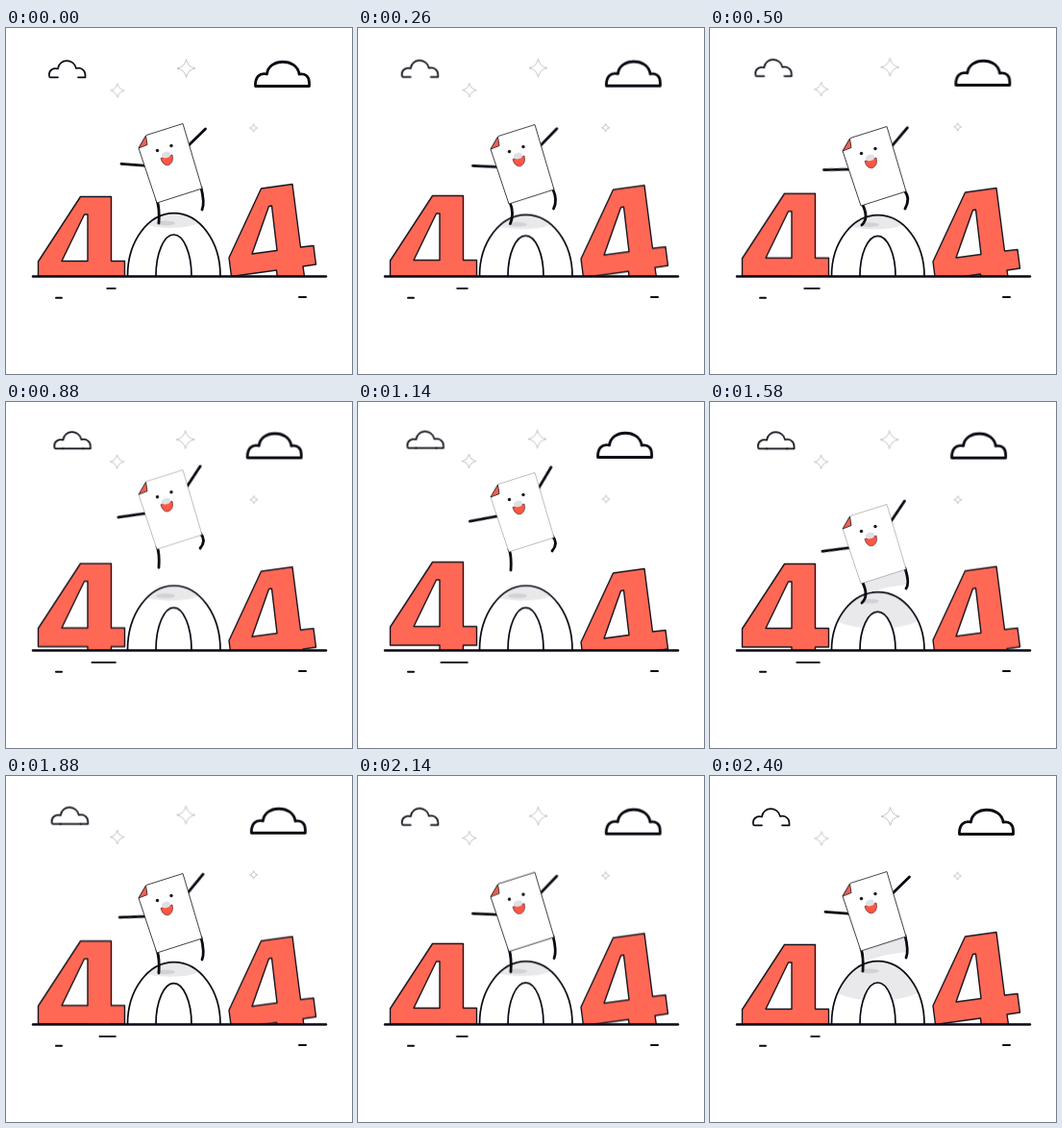
Write an HTML page without scripts that moves like this. It is 360 by 360 pixels and loops after 2420 ms.

```html
<!DOCTYPE html>
<html lang="en">
<head>
<meta charset="utf-8">
<title>404</title>
<style>
  html, body { margin: 0; width: 100%; height: 100%; overflow: hidden; background: #fff; }
  svg { display: block; width: 100%; height: 100%; }

  .ink { fill: none; stroke: #080912; stroke-linecap: round; stroke-linejoin: round; }
  .digit { fill: #ff6854; stroke: #17141f; stroke-width: 1.4; stroke-linejoin: round; }
  .star { fill: #fff; stroke: #c4c4c4; stroke-width: 1; stroke-linejoin: round; }
  .thin { stroke: #2b2b33; stroke-width: .9; stroke-linejoin: round; }
  .shade { fill: #e9e9ec; }

  /* Slow back-and-forth shared by clouds, stars, digits and arms */
  .drift { animation: drift 1210ms cubic-bezier(.37, 0, .63, 1) infinite alternate; }
  @keyframes drift {
    from { transform: translate(0, 0) rotate(0deg); }
    to { transform: translate(var(--x, 0px), var(--y, 0px)) rotate(var(--r, 0deg)); }
  }

  .dash { transform-origin: 114.5px 271px; animation: stretch 1210ms cubic-bezier(.37, 0, .63, 1) infinite alternate; }
  @keyframes stretch { to { transform: scaleX(2.9); } }

  .base { animation: close 2420ms step-end infinite; }
  @keyframes close { 0%, 88% { opacity: 0; } 29% { opacity: 1; } }

  .hop { animation: hop 2420ms infinite; }
  @keyframes hop {
    0% { transform: translateY(0); animation-timing-function: ease-in; }
    20.7% { transform: translateY(3px); animation-timing-function: ease-out; }
    26.4% { transform: translateY(6px); animation-timing-function: cubic-bezier(.33, .67, .67, 1); }
    40.5% { transform: translateY(-32px); animation-timing-function: cubic-bezier(.33, 0, .67, .33); }
    57.9% { transform: translateY(9px); animation-timing-function: ease-in-out; }
    65.3% { transform: translateY(7px); animation-timing-function: linear; }
    77.7% { transform: translateY(2px); animation-timing-function: ease-out; }
    100% { transform: translateY(0); }
  }

  /* The outline pales in the air, the shadow spreads on landing */
  .sheet { animation: pale 2420ms linear infinite; }
  @keyframes pale { 0%, 26%, 74%, 100% { stroke-opacity: 1; } 32%, 66% { stroke-opacity: .35; } }
  .landing { animation: landing 2420ms step-end infinite; }
  @keyframes landing { 0%, 70% { opacity: 0; } 57.9%, 94% { opacity: 1; } }

  .arch { transform-origin: 174.5px 258px; animation: squash 2420ms infinite; }
  .arch path { vector-effect: non-scaling-stroke; }
  @keyframes squash {
    0%, 100% { transform: scaleY(1); }
    20.7% { transform: scaleY(.97); }
    26.4% { transform: scaleY(.93); }
    32%, 55.4% { transform: scaleY(1.025); }
    58.5% { transform: scaleY(.91); }
    65.3% { transform: scaleY(.923); }
    77.7% { transform: scaleY(.985); }
  }

  .left-leg { animation: left-leg 2420ms linear infinite; }
  @keyframes left-leg {
    0%, 77.7%, 100% { d: path("M157 179Q160 188 159 203"); }
    20.7%, 26.4%, 58%, 65.3% { d: path("M158 179Q166 195 158 202"); }
    32%, 55% { d: path("M157 179Q160 186 159 201"); }
  }

  .right-leg { animation: right-leg 2420ms linear infinite; }
  @keyframes right-leg {
    0%, 77.7%, 100% { d: path("M203 166Q207 182 204 189"); }
    20.7% { d: path("M202 166Q209 174 203 185"); }
    32%, 52% { d: path("M202 165Q209 173 202 181"); }
    65.3% { d: path("M203 166Q208 182 204 187"); }
  }
</style>
</head>
<body>
<svg viewBox="0 0 360 360">
  <defs>
    <path id="spark" d="M0-9.5Q1.5-1.5 9.500 0Q1.5 1.5 0 9.5Q-1.5 1.5-9.5 0Q-1.5-1.5 0-9.5Z" vector-effect="non-scaling-stroke"/>
    <path id="bow" d="M126.500 258A48 65 0 0 1 223 258H193A18.5 43 0 0 0 156 258Z"/>
    <clipPath id="above"><path d="M0 0H360V258H0Z"/></clipPath>
    <clipPath id="inside"><use href="#bow"/></clipPath>
  </defs>

  <!-- Sky -->
  <g class="drift" style="--x:6.5px;--y:-3.5px">
    <g class="ink" stroke-width="1.7">
      <path d="M54 51.3H46Q44.5 51 45 48C45 44 49 41 54 42.5C55 31.5 71 31.5 73 42C78 40.5 82.5 44 82.5 49V51.3H75"/>
      <path class="base" d="M54 51.3H75"/>
    </g>
  </g>
  <g class="drift" style="--x:-10px;--y:-3px">
    <path class="ink" stroke-width="2.8" d="M259.5 60.5H315.5V57C315.5 50 311 47 305 48C303 31 273 31 271.5 48C264 46 259 51 259.5 60.5Z"/>
  </g>
  <g class="star">
    <g class="drift" style="--x:-1px;--y:-3.5px"><use href="#spark" x="187.5" y="42"/></g>
    <g class="drift" style="--x:-.5px;--y:-3.5px"><use href="#spark" transform="translate(116 65) scale(.78)"/></g>
    <g class="drift" style="--x:.5px;--y:-3px"><use href="#spark" transform="translate(257.5 104) scale(.43)"/></g>
  </g>

  <!-- Outer digits, sinking behind the ground line -->
  <g clip-path="url(#above)">
    <path class="digit drift" style="--y:-9px" fill-rule="evenodd"
      d="M77.5 175.5H109.5V242.5H123.5V262H109.5V276H85V262H33.5V243ZM81.5 194H85V242.5H58Z"/>
    <path class="digit drift" style="--y:11px" fill-rule="evenodd"
      d="M265.5 167L298 162.5L306.5 228L320 226.5L322.5 246L309 248L311 262H282.5L281.5 252L234.5 258.5L232 239ZM273.5 185.5L276.5 185L282 231.5L256 235Z"/>
  </g>

  <!-- Arch -->
  <g class="arch">
    <use href="#bow" fill="#fff"/>
    <g clip-path="url(#inside)">
      <ellipse class="shade" cx="171" cy="198" rx="34" ry="10"/>
      <ellipse class="shade landing" cx="174" cy="205" rx="60" ry="29"/>
      <ellipse cx="166" cy="203" rx="10" ry="2.4" fill="#d2d2d5"/>
    </g>
    <path class="ink" stroke-width="1.7" d="M126.5 258A48 65 0 0 1 223 258M156 258A18.5 43 0 0 1 193 258"/>
  </g>

  <!-- Ground -->
  <g class="ink" stroke-width="2.4">
    <path d="M28 258.5H333"/>
    <path stroke-width="2" d="M52 280.8H58M305 280H312"/>
    <path class="dash" stroke-width="1.8" stroke-linecap="butt" d="M104.5 271H114.5"/>
  </g>

  <!-- Dancing sheet -->
  <g class="hop">
    <path class="shade landing" d="M160 178L204 165V183L184 186L162 192Z"/>
    <g class="ink" stroke-width="2.8">
      <path class="left-leg" d="M157 179Q160 188 159 203"/>
      <path class="right-leg" d="M203 166Q207 182 204 189"/>
      <path class="drift" style="--x:-4px;--y:1px;--r:-15deg;transform-origin:150px 144px" d="M120 141.3L150 143.7"/>
      <path class="drift" style="--x:-1.5px;--y:-2px;--r:-15deg;transform-origin:170px 120px" d="M207.5 105L187 125"/>
    </g>
    <path class="thin sheet" fill="#fff" d="M146 111.5L184 99.5L204 167L157 182L138 125Z"/>
    <path class="thin" fill="#f4604e" d="M145.5 112L147 121.5L138 125Z"/>
    <g fill="#14141c">
      <circle cx="157.5" cy="127.5" r="1.7"/>
      <circle cx="172" cy="122.5" r="1.7"/>
    </g>
    <path d="M161 135.5L173 132C174.5 138 172 142 168.5 142.7C165 143.2 162 140 161 135.5Z" fill="#ff5543" stroke="#5a2a2c" stroke-width=".7"/>
    <ellipse cx="166.500" cy="132" rx="4.6" ry="3.2" transform="rotate(-17 166.5 132)" fill="#dfdfe6"/>
  </g>
</svg>
</body>
</html>
```
